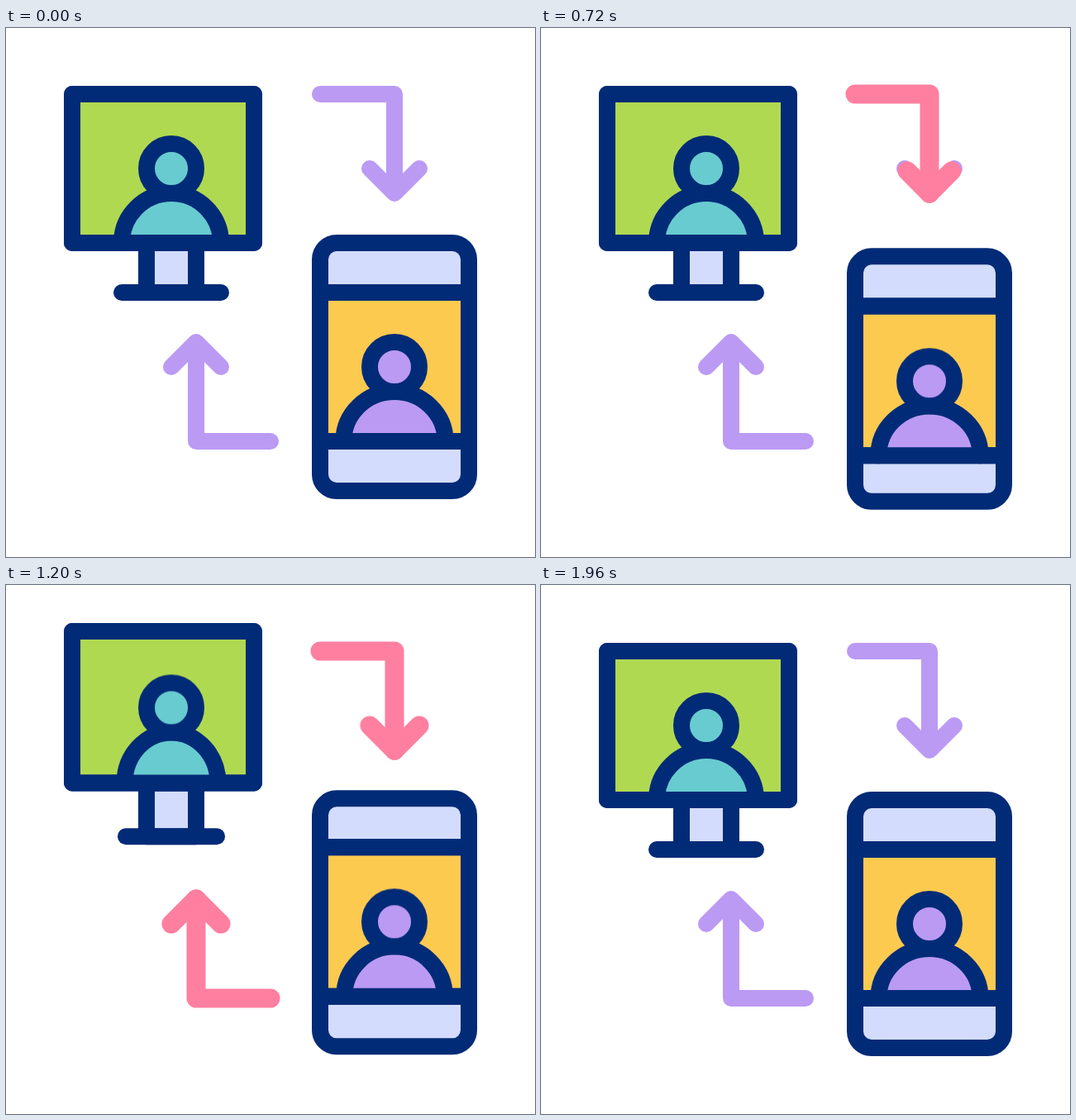
An HTML page without scripts for the animation above (2000 ms loop, 640x640 px).

```html
<!DOCTYPE html>
<html lang="en">
<head>
<meta charset="utf-8">
<title>Device exchange</title>
<style>
html, body { margin: 0; height: 100%; overflow: hidden; background: #fff; }
svg { display: block; width: 100%; height: 100%; }

.ink { stroke: #022b77; stroke-width: 20; stroke-linecap: round; stroke-linejoin: round; }
.butt { stroke-linecap: butt; }
.pale { fill: #d3dcfd; }
.green { fill: #b0d952; }
.teal { fill: #68cbd0; }
.yellow { fill: #fdca50; }
.lilac { fill: #bb9af3; }
.arrow { fill: none; stroke: #bb9af3; stroke-width: 20; stroke-linecap: round; stroke-linejoin: round; }
.hot { stroke: #ff7fa0; stroke-width: 23; }
.hot path { stroke-dasharray: 1 2; stroke-dashoffset: 1.3; }

.screen, .stand, .base, .head1, .body1,
.case, .view, .head2, .body2, .hot path {
  animation: 2s cubic-bezier(.333, 0, .667, 1) infinite;
}

/* Monitor: two hops */
.screen { animation-name: screen; }
.stand { animation-name: stand; }
.base { animation-name: base; }
.head1 { animation-name: head1; }
.body1 { animation-name: body1; }
@keyframes screen {
  0%, 4%, 24%, 54%, 74%, to { y: 80px; height: 180px; }
  14%, 64% { y: 43.5px; height: 185.2px; }
}
@keyframes stand {
  0%, 4%, 24%, 54%, 74%, to { y: 260px; height: 60px; }
  14%, 64% { y: 228.7px; height: 67.1px; }
}
@keyframes base {
  0%, 4%, 24%, 54%, 74%, to { d: path("M140 320H260"); }
  14%, 64% { d: path("M147.6 295.8H252.4"); }
}
@keyframes head1 {
  0%, 4%, 24%, 54%, 74%, to { transform: translateY(0); }
  14%, 64% { transform: translateY(-33px); }
}
@keyframes body1 {
  0%, 4%, 24%, 54%, 74%, to { d: path("M140 260A60 60 0 0 1 260 260"); }
  14%, 64% { d: path("M145.4 228.7A54.6 61.7 0 0 1 254.6 228.7"); }
}

/* Phone: dips, rebounds, settles */
.case { animation-name: case, stretch; }
.view { animation-name: view; }
.head2 { animation-name: head2; }
.body2 { animation-name: body2; }
@keyframes case {
  0%, 32%, 62%, to { y: 260px; }
  42% { y: 305.5px; }
  52% { y: 243.5px; }
}
@keyframes stretch {
  0%, 32%, 52%, to { height: 300px; }
  36% { height: 296.5px; }
  42% { height: 302.5px; }
}
@keyframes view {
  0%, 32%, 62%, to { y: 320px; height: 180px; }
  42% { y: 366px; height: 182.3px; }
  52% { y: 292.5px; height: 184px; }
}
@keyframes head2 {
  0%, 32%, 62%, to { transform: translateY(0); }
  42% { transform: translateY(48px); }
  52% { transform: translateY(-26.5px); }
}
@keyframes body2 {
  0%, 32%, 62%, to { d: path("M408.4 500A61.6 60 0 0 1 531.6 500"); }
  42% { d: path("M408.4 548.3A61.6 60 0 0 1 531.6 548.3"); }
  52% { d: path("M416.7 476.5A53.3 63 0 0 1 523.3 476.5"); }
}

/* Arrows: offset 1.3 hides the round cap, 1 to 0 draws */
.hot .line1 { animation-name: line1; }
.hot .tip1 { animation-name: tip1; }
.hot .line2 { animation-name: line2; }
.hot .tip2 { animation-name: tip2; }
@keyframes line1 {
  0%, 18% { stroke-dashoffset: 1.3; }
  18.01% { stroke-dashoffset: 1; }
  28%, 84% { stroke-dashoffset: 0; }
  97.5% { stroke-dashoffset: 1; }
  97.51%, to { stroke-dashoffset: 1.3; }
}
@keyframes tip1 {
  0%, 28% { stroke-dashoffset: 1.3; }
  28.01% { stroke-dashoffset: 1; }
  38%, 74% { stroke-dashoffset: 0; }
  84% { stroke-dashoffset: 1; }
  84.01%, to { stroke-dashoffset: 1.3; }
}
@keyframes line2 {
  0%, 37% { stroke-dashoffset: 1.3; }
  37.01% { stroke-dashoffset: 1; }
  47%, 83.3% { stroke-dashoffset: 0; }
  97.5% { stroke-dashoffset: 1; }
  97.51%, to { stroke-dashoffset: 1.3; }
}
@keyframes tip2 {
  0%, 47% { stroke-dashoffset: 1.3; }
  47.01% { stroke-dashoffset: 1; }
  57%, 73.3% { stroke-dashoffset: 0; }
  83.3% { stroke-dashoffset: 1; }
  83.31%, to { stroke-dashoffset: 1.3; }
}
</style>
</head>
<body>
<svg viewBox="0 0 640 640">
  <g class="ink">
    <rect class="stand pale" x="170" y="260" width="60" height="60"/>
    <path class="base" d="M140 320H260"/>
    <rect class="screen green" x="80" y="80" width="220" height="180"/>
    <path class="body1 teal butt" d="M140 260A60 60 0 0 1 260 260"/>
    <circle class="head1 teal" cx="200" cy="170" r="30"/>
    <rect class="screen" x="80" y="80" width="220" height="180" fill="none"/>
  </g>

  <g class="ink">
    <rect class="case pale" x="380" y="260" width="180" height="300" rx="20"/>
    <rect class="view yellow" x="380" y="320" width="180" height="180"/>
    <path class="body2 lilac" d="M408.4 500A61.6 60 0 0 1 531.6 500"/>
    <circle class="head2 lilac" cx="470" cy="410" r="30"/>
    <rect class="view" x="380" y="320" width="180" height="180" fill="none"/>
  </g>

  <g class="arrow">
    <path d="M380 80H470V200M440 170L470 200L500 170"/>
    <path d="M320 500H230V380M200 410L230 380L260 410"/>
  </g>
  <g class="arrow hot">
    <path class="line1" pathLength="1" d="M380 80H470V200"/>
    <path class="tip1" pathLength="1" d="M470 200L440 170"/>
    <path class="tip1" pathLength="1" d="M470 200L500 170"/>
    <path class="line2" pathLength="1" d="M320 500H230V380"/>
    <path class="tip2" pathLength="1" d="M230 380L200 410"/>
    <path class="tip2" pathLength="1" d="M230 380L260 410"/>
  </g>
</svg>
</body>
</html>
```
